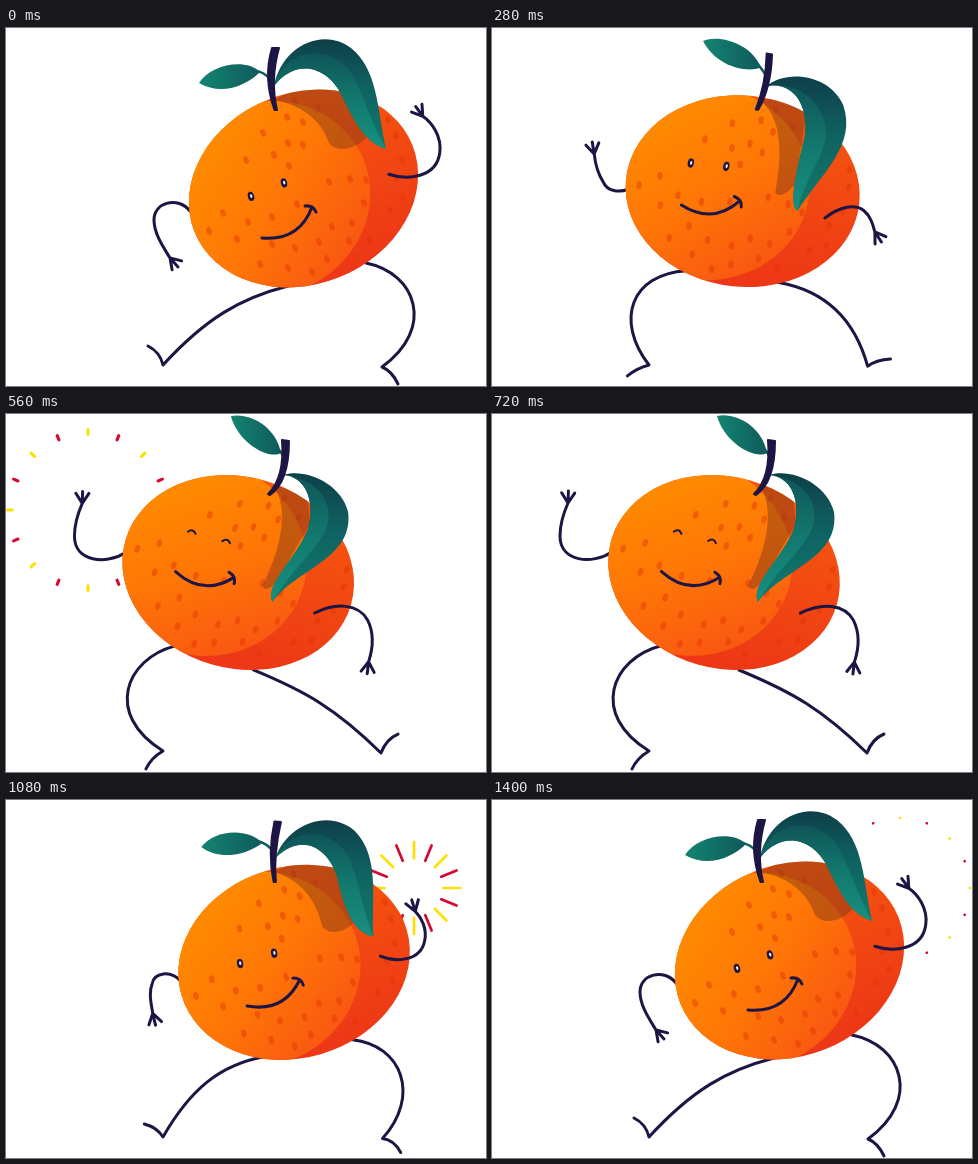
These frames come from a looping animation (480 by 358 pixels, 1440 ms). An HTML page:

```html
<!DOCTYPE html>
<html lang="en">
<head>
<meta charset="utf-8">
<title>Dancing orange</title>
<style>
html, body { margin: 0; height: 100%; overflow: hidden; background: #fff; }
svg { display: block; width: 100vw; height: 100vh; }
.line { fill: none; stroke: #1d1543; stroke-width: 3; stroke-linecap: round; stroke-linejoin: round; }
#spots { fill: #e23205; fill-opacity: .45; }
</style>
</head>
<body>
<svg viewBox="0 0 480 358">
  <defs>
    <linearGradient id="light" gradientUnits="userSpaceOnUse" x1="215" y1="100" x2="325" y2="255">
      <stop offset="0" stop-color="#ff8c00"/><stop offset=".5" stop-color="#ff7606"/><stop offset="1" stop-color="#f85612"/>
    </linearGradient>
    <linearGradient id="dark" gradientUnits="userSpaceOnUse" x1="310" y1="70" x2="370" y2="230">
      <stop offset="0" stop-color="#f5560e"/><stop offset="1" stop-color="#ed3716"/>
    </linearGradient>
    <linearGradient id="outer" x1="0" y1="0" x2="0" y2="1">
      <stop offset="0" stop-color="#0e3f49"/><stop offset=".45" stop-color="#0f6262"/><stop offset="1" stop-color="#107a6c"/>
    </linearGradient>
    <linearGradient id="inner" x1="0" y1="0" x2="0" y2="1">
      <stop offset="0" stop-color="#0f5558"/><stop offset=".5" stop-color="#127a6e"/><stop offset="1" stop-color="#179080"/>
    </linearGradient>
    <linearGradient id="small" x1="0" y1="0" x2="1" y2="0">
      <stop offset="0" stop-color="#148472"/><stop offset="1" stop-color="#0f5a5b"/>
    </linearGradient>
    <clipPath id="peel"><ellipse id="peelShape" cx="297.5" cy="160.5" rx="117.3" ry="95.7"/></clipPath>
    <clipPath id="peelFixed"><ellipse cx="297.5" cy="160.5" rx="117.3" ry="95.7" transform="rotate(-21.5 297.5 160.5)"/></clipPath>
  </defs>
  <g id="burst" fill="none" stroke-width="2.7" stroke-linecap="round">
    <path id="yellow" stroke="#ffe000"/><path id="red" stroke="#d5082f"/>
  </g>
  <path id="leftArm" class="line"/>
  <path id="leftLeg" class="line"/>
  <path id="rightLeg" class="line"/>
  <g id="body">
    <g clip-path="url(#peelFixed)">
      <path d="M150 30h300v260h-300z" fill="url(#dark)"/>
      <ellipse cx="260.3" cy="171" rx="105" ry="97" fill="url(#light)" transform="rotate(-21.5 260.3 171)"/>
      <g id="spots"></g>
    </g>
  </g>
  <path id="shadow" clip-path="url(#peel)" fill="#883c16" fill-opacity=".5"/>
  <g id="face">
    <path class="line" d="M256 210C279 212 297 203 306 179M299 178Q307 177 310 184"/>
    <g id="open"></g>
    <g id="closed" class="line" style="stroke-width:2"></g>
  </g>
  <path id="stalk" fill="none" stroke="#0f5a5b" stroke-width="2.5"/>
  <path id="smallLeaf" fill="url(#small)"/>
  <path id="leaf" fill="url(#outer)"/>
  <path id="leafHalf" fill="url(#inner)"/>
  <path id="stem" class="line" style="stroke-width:2;fill:#1d1543"/>
  <path id="rightArm" class="line"/>
</svg>
<script>
const $ = id => document.getElementById(id);
const LOOP = 1440, HALF = 720, STEP = 40;
const knots = [0, .395, .605, 1];

// Four poses each, from leaning right to leaning left.
const poses = {
  leftArm: [
    'M184 183C172 168 148 174 148 192C148 206 158 220 164 230',
    'M157 176C150 172 145 170 140 170C131 171 124 174 119 180',
    'M144 169C137 169 131 168 126 164C119 159 114 152 111 144',
    'M120 138C100 151 68 148 68 122C68 108 72 98 76 89'],
  leftLeg: [
    'M282 258C235 270 200 290 157 337Q154 324 142 318',
    'M221 253C175 255 155 290 157 337Q146 333 133 335',
    'M205 247C150 248 134 290 157 337Q145 338 134 344',
    'M168 232C120 245 97 300 157 337Q145 344 140 355'],
  rightLeg: [
    'M360 235C410 245 430 300 376 339Q386 343 392 356',
    'M322 248C370 248 390 290 377 338Q390 335 399 345',
    'M302 253C354 258 377 298 376 338Q386 334 400 336',
    'M247 256C300 278 330 295 375 339Q380 325 392 320'],
  shadow: [
    'M268 72C300 78 316 95 323 115C332 126 350 121 362 108L345 60L300 55Z',
    'M268 72C292 85 302 115 304 148C310 154 322 152 330 140L325 70L300 62Z',
    'M268 72C292 88 296 120 293 160C298 165 306 162 316 150L318 80L300 65Z',
    'M268 72C283 95 275 135 256 172C260 178 264 174 270 168L304 110L300 70Z'],
  smallLeaf: [
    'M193 55C205 36 240 30 254 44C240 58 215 68 193 55Z',
    'M200 32C215 18 245 22 261 41C245 48 215 50 200 32Z',
    'M206 19C222 10 255 18 266 40C250 46 220 42 206 19Z',
    'M225 2C243 -2 270 12 275 39C262 46 232 28 225 2Z'],
  stalk: [
    'M250 43Q258 44 264 51', 'M257 38Q265 42 271 50',
    'M262 36Q268 42 272 48', 'M273 36Q276 39 278 43'],
  stem: [
    'M268.5 82Q257 50 266 20L273 20Q264 52 271 82Z',
    'M266 82Q269 58 272.5 24L278 25Q273 60 268 82Z',
    'M264.5 82Q272 55 274 25L279 26Q277 58 267 82Z',
    'M262 80Q279 64 276 26L283 27Q283 68 264 81Z']
};

// Big leaf: base, outer edge, tip, inner edge and central vein.
const leafEdges = {
  outer: [
    'M268 58C275 20 315 -2 345 20C372 42 371 80 380 121',
    'M272 58C290 32 335 25 355 52C375 85 355 120 343 163',
    'M273 58C291 37 337 36 354 68C370 105 345 136 321 178',
    'M277 61C300 54 335 70 342 98C348 145 290 155 266 188'],
  vein: [
    'M268 58C285 10 335 22 348 50C362 80 366 95 380 121',
    'M272 58C300 35 330 55 338 80C344 105 338 140 343 163',
    'M273 58C310 45 335 75 338 100C338 125 322 150 321 178',
    'M277 61C318 66 328 95 320 115C308 140 285 155 266 188'],
  inner: [
    'C358 114 348 92 336 68C322 39 291 29 268 58Z',
    'C326 165 321 130 323 95C322 60 300 40 272 58Z',
    'C309 177 313 131 317 105C320 71 300 48 273 58Z',
    'C258 170 290 145 302 115C310 85 298 62 277 61Z']
};
for (const [id, edge] of [['leaf', 'outer'], ['leafHalf', 'vein']])
  poses[id] = leafEdges[edge].map((d, i) => d + leafEdges.inner[i]);

// Relative to the shoulder.
const rightArm = [
  'M0 0C18 6 48 4 51 -22C53 -38 43 -52 34 -58',
  'M0 0C6 5 12 7 20 6C26 6 33 4 39 0',
  'M0 0C7 -9 14 -15 22 -18C29 -21 36 -21 44 -21',
  'M0 0C22 -11 44 -9 53 7C60 21 58 37 54 49'];

const spots = [
  257,105, 281,89, 289,73, 312,80, 297,94, 282,115, 297,117, 240,132, 268,127, 283,138,
  217,185, 203,203, 231,211, 242,194, 266,189, 291,176, 266,216, 289,220, 254,236,
  282,240, 306,244, 321,231, 313,214, 326,199, 346,195, 343,213, 364,213, 358,175,
  323,154, 344,151, 360,152, 397,170, 384,182, 390,151, 390,108, 396,132, 382,92];
for (let i = 0; i < spots.length; i += 2)
  $('spots').innerHTML += `<ellipse rx="2.7" ry="4" transform="translate(${spots[i]} ${spots[i + 1]}) rotate(-20)"/>`;

for (const at of ['245 168.4', '278 154.9']) {
  $('open').innerHTML += `<g transform="translate(${at}) rotate(-15)"><ellipse rx="3.1" ry="4.7" fill="#1d1543"/><ellipse cx=".3" cy="-.3" rx="1.1" ry="1.9" fill="#fff"/></g>`;
  $('closed').innerHTML += `<path d="M-4 1Q0 -4 4 1" transform="translate(${at}) rotate(-21.5)"/>`;
}

// Smooth curve through four values at the knots.
function spline(v, x) {
  const gap = [0, 1, 2].map(k => knots[k + 1] - knots[k]);
  const slope = gap.map((g, k) => (v[k + 1] - v[k]) / g);
  const tangent = k => k === 0 ? slope[0] : k === 3 ? slope[2] :
    (slope[k - 1] * gap[k] + slope[k] * gap[k - 1]) / (gap[k - 1] + gap[k]);
  const i = x < knots[1] ? 0 : x < knots[2] ? 1 : 2;
  const u = (x - knots[i]) / gap[i], w = 1 - u;
  return w * w * (1 + 2 * u) * v[i] + u * u * (3 - 2 * u) * v[i + 1] +
    gap[i] * u * w * (w * tangent(i) - u * tangent(i + 1));
}

const number = /-?\d+(\.\d+)?/g;
function morph(keys, x) {
  const values = keys.map(d => d.match(number).map(Number));
  let n = 0;
  return keys[0].replace(number, () => {
    const v = spline(values.map(a => a[n]), x);
    n++;
    return (n > 1 ? ' ' : '') + v.toFixed(2);
  });
}

// cubic-bezier(.24, 0, .29, 1)
function ease(x) {
  if (x >= 1) return 1;
  let lo = 0, hi = 1;
  for (let i = 0; i < 24; i++) {
    const s = (lo + hi) / 2;
    3 * s * (1 - s) * ((1 - s) * .24 + s * .29) + s ** 3 < x ? lo = s : hi = s;
  }
  return lo * lo * (3 - 2 * lo);
}

const smooth = x => (x = Math.min(1, Math.max(0, x)), x * x * (3 - 2 * x));
const polar = (r, deg) => [r * Math.cos(deg * Math.PI / 180), r * Math.sin(deg * Math.PI / 180)];

// Adds three fingers at the end of an arm path.
function withHand(d, angle) {
  const wrist = d.match(number).slice(-2);
  return d + [-34, 0, 32].map(a => `M${wrist}l${polar(12, angle + a)}`).join('');
}

function drawBurst(cx, cy, scale, phase) {
  const from = 22 + 48 * smooth((phase - 330) / 280);
  const to = 22 + 48 * smooth((phase - 280) / 240);
  const rays = ['', ''];
  if (phase > 280) for (let i = 0; i < 16; i++)
    rays[i % 2] += `M${polar(from, i * 22.5)}L${polar(to + .01, i * 22.5)}`;
  $('yellow').setAttribute('d', rays[0]);
  $('red').setAttribute('d', rays[1]);
  $('burst').setAttribute('transform', `translate(${cx} ${cy}) scale(${scale})`);
}

function draw(t) {
  const toLeft = t < HALF;
  const e = ease(t % HALF / 600), lead = e ** .54;
  const q = toLeft ? e : 1 - e, armQ = toLeft ? lead : 1 - lead;

  for (const id in poses) $(id).setAttribute('d', morph(poses[id], q));
  $('leftArm').setAttribute('d', withHand(morph(poses.leftArm, q), spline([48, 142, 236, 272], q)));

  const x = spline([297.5, 271, 258.5, 232], q);
  const y = spline([160.5, 165, 164.5, 158.5], q);
  const tilt = spline([-21.5, -6.3, 1.6, 16], q);
  const turn = `translate(${x} ${y}) rotate(${tilt + 21.5}) translate(-297.5 -160.5)`;
  $('body').setAttribute('transform', turn);
  $('face').setAttribute('transform', `${turn} translate(${-8.9 * q} ${-12.2 * q})`);
  $('peelShape').setAttribute('transform', `${turn} rotate(-21.5 297.5 160.5)`);

  $('rightArm').setAttribute('d', withHand(morph(rightArm, armQ), spline([-126, -32, 2, 97], armQ)));
  $('rightArm').setAttribute('transform', `translate(${x} ${y}) rotate(${tilt}) translate(84.6 18) rotate(${-tilt})`);

  const shut = q > .75;
  $('open').style.display = shut ? 'none' : '';
  $('closed').style.display = shut ? '' : 'none';

  toLeft ? drawBurst(82, 96, 1.15, t) : drawBurst(408, 88, 1, t - 680);
}

const start = performance.now();
function tick() {
  const t = performance.now() - start;
  draw(Math.floor(t / STEP + .1) * STEP % LOOP);
  requestAnimationFrame(tick);
}
tick();
</script>
</body>
</html>
```
